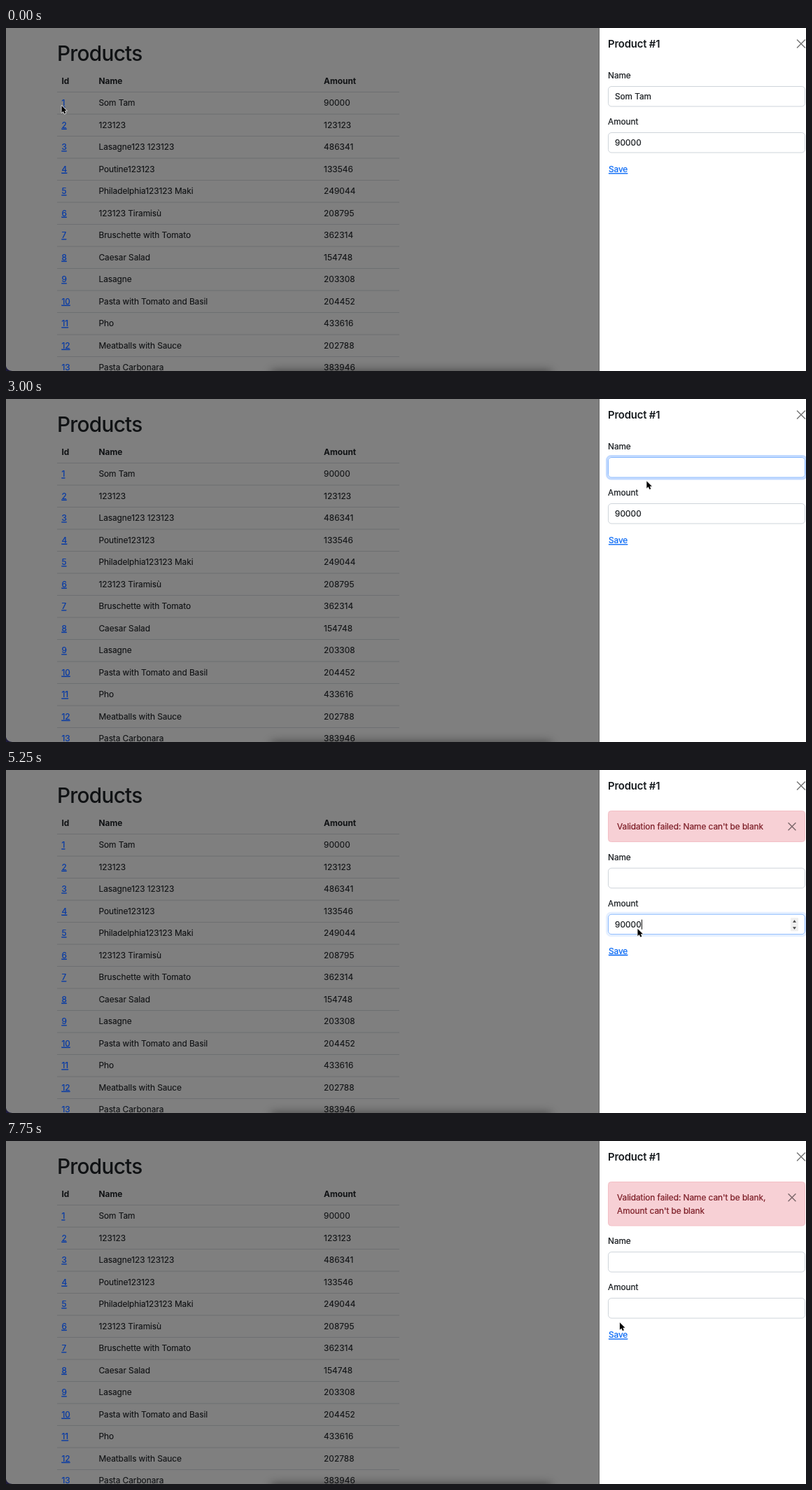
An HTML page for the animation above (8 s loop, 1143 px wide and 490 px high).

```html
<!DOCTYPE html>
<html lang="en">
<head>
<meta charset="utf-8">
<title>Products</title>
<style>
  html, body { margin: 0; width: 100%; height: 100%; overflow: hidden; background: #7f7f7f; }
  svg { display: block; width: 100%; height: 100%; }
  text {
    font: 400 11.9px Inter, "Liberation Sans", sans-serif;
    letter-spacing: -.07px;
    color: #171b1f;
    fill: currentColor;
    stroke: currentColor;
    stroke-width: .22;
    white-space: pre;
  }
  #list text { color: #101214; stroke-width: .1; }
  #list .num, .num { letter-spacing: .07px; }
  #list .link { color: #0539a6; stroke-width: .22; text-decoration: underline; }
  #list line { stroke: #6d6f71; }
  #list .head { font-weight: 700; letter-spacing: 0; stroke: none; }
  #list .title { font-size: 29.8px; font-weight: 500; letter-spacing: -.75px; stroke: none; }
  .subtitle { font-size: 14.9px; font-weight: 600; letter-spacing: -.2px; stroke: none; }
  .save { color: #0567f5; text-decoration: underline; }
  .save.hover { color: #0a58ca; }
  .field { fill: #fff; stroke: #ced4da; }
  .focus .field { stroke: #86b7fe; }
  .ring { fill: none; stroke: #0d6efd; stroke-width: 3; opacity: 0; }
  .mark { fill: #abcef8; }
  .caret { fill: #111; }
  .cross { fill: none; stroke: #777; stroke-width: 1.5; stroke-linecap: round; }
  #alert rect { fill: #f7d0d5; stroke: #f3bfc6; }
  #alert text { color: #7c1d26; }
  #alert .cross { stroke: #7c686b; }
</style>
</head>
<body>
<svg viewBox="0 0 1143 490" preserveAspectRatio="none">
  <defs>
    <filter id="blur" x="-20%" y="-300%" width="140%" height="700%">
      <feGaussianBlur stdDeviation="7"/>
    </filter>
  </defs>
  <rect width="1143" height="490" fill="#7f7f7f"/>
  <g id="list">
    <text class="title" x="73" y="47">Products</text>
  </g>
  <rect x="379" y="490" width="400" height="14" fill="#000" opacity=".5" filter="url(#blur)"/>
  <path d="M0 483Q1 489 9 490H0Z" fill="#1d1b3c"/>

  <rect x="847" width="1" height="490" fill="#666"/>
  <rect x="848" width="295" height="490" fill="#fff"/>
  <text class="subtitle" x="860" y="28">Product #1</text>
  <path class="cross" d="M1130.5 17l11 11m0-11l-11 11"/>

  <g id="alert">
    <rect x="860.5" y="58.5" width="281" height="44" rx="4"/>
    <text x="873" y="85"></text>
    <text x="873" y="103.5">Amount can't be blank</text>
    <path class="cross" d="M1118 75.700l10 10m0-10l-10 10"/>
  </g>

  <g id="form">
    <text x="860" y="72.300">Name</text>
    <g id="name">
      <rect class="ring" x="858.5" y="81.500" width="285" height="32.500" rx="6"/>
      <rect class="field" x="860.5" y="83.500" width="281" height="28.500" rx="4.600"/>
      <rect class="mark" x="870" y="88" width="52" height="19"/>
      <text x="870" y="102.200">Som Tam</text>
      <rect class="caret" x="922" y="91" width="1" height="14"/>
    </g>
    <text x="860" y="138.300">Amount</text>
    <g id="amount">
      <rect class="ring" x="858.5" y="147.500" width="285" height="32.500" rx="6"/>
      <rect class="field" x="860.5" y="149.500" width="281" height="28.500" rx="4.600"/>
      <rect class="mark" x="870" y="154.500" width="38" height="19"/>
      <text class="num" x="870" y="168.200">90000</text>
      <rect class="caret" x="908" y="157" width="1" height="14"/>
      <g id="spin">
        <rect x="1121" y="154.500" width="11" height="19" rx="1" fill="#efefef"/>
        <path d="M1124 161l2.500-3.500 2.500 3.500zm0 6.500l2.500 3.500 2.500-3.500z" fill="#444"/>
      </g>
    </g>
    <text class="save" x="861" y="206.200">Save</text>
  </g>

  <path id="cursor" d="M0 0V10L2.300 7.900 4 11.600 5.800 10.800 4.200 7.200H7.300Z"
        fill="#000" stroke="#e4e4e4" stroke-width="1.600" stroke-linejoin="round" paint-order="stroke"/>
</svg>
<script>
const $ = s => document.querySelector(s);
const LOOP = 8000, STEP = 250;

const products = [
  ['Som Tam', 90000], ['123123', 123123], ['Lasagne123 123123', 486341],
  ['Poutine123123', 133546], ['Philadelphia123123 Maki', 249044],
  ['123123 Tiramisù', 208795], ['Bruschette with Tomato', 362314],
  ['Caesar Salad', 154748], ['Lasagne', 203308],
  ['Pasta with Tomato and Basil', 204452], ['Pho', 433616],
  ['Meatballs with Sauce', 202788], ['Pasta Carbonara', 383946]
];

function add(tag, attrs, text = '') {
  const el = document.createElementNS('http://www.w3.org/2000/svg', tag);
  for (const key in attrs) el.setAttribute(key, attrs[key]);
  el.textContent = text;
  $('#list').append(el);
}

function addRow(cells, y, classes) {
  [79.5, 132.5, 454].forEach((x, i) => add('text', { x, y, class: classes[i] }, cells[i]));
  add('line', { x1: 73, x2: 562, y1: y + 11.7, y2: y + 11.7 });
}

addRow(['Id', 'Name', 'Amount'], 79.8, ['head', 'head', 'head']);
products.forEach(([name, amount], i) =>
  addRow([i + 1, name, amount], 111.3 + i * 31.5, ['link', '', 'num']));

// Pointer stops: time, x, y
const stops = [
  [0, 79.5, 111], [1250, 919.5, 102.5], [1500, 922, 101.5], [2750, 922, 101.5],
  [3750, 880, 203.5], [4500, 880, 203.5], [5250, 902.5, 227], [5750, 904.5, 224.5],
  [6500, 904.5, 224.5], [7000, 884, 245], [7250, 877, 259.5], [LOOP, 877, 259.5]
];

function pointer(t) {
  const i = stops.findIndex(s => s[0] > t);
  const [t0, x0, y0] = stops[i - 1], [t1, x1, y1] = stops[i];
  const p = (t - t0) / (t1 - t0), e = p * p * (3 - 2 * p);
  return [x0 + (x1 - x0) * e, y0 + (y1 - y0) * e];
}

const show = (el, on) => { el.style.display = on ? '' : 'none'; };

function setField(id, { filled, ring, marked, caret }) {
  const box = $(id);
  box.classList.toggle('focus', ring > 0);
  box.querySelector('.ring').style.opacity = ring * .25;
  show(box.querySelector('text'), filled);
  show(box.querySelector('.mark'), marked);
  show(box.querySelector('.caret'), caret);
}

function render(t) {
  const within = (a, b) => t >= a && t < b;
  const errors = t < 4000 ? 0 : t < 7500 ? 1 : 2;
  const [first, second] = $('#alert').querySelectorAll('text');

  show($('#alert'), errors);
  show(second, errors === 2);
  first.textContent = "Validation failed: Name can't be blank" + (errors === 2 ? ',' : '');
  $('#alert rect').setAttribute('height', errors === 2 ? 62.5 : 44);
  $('#form').setAttribute('transform', `translate(0 ${[0, 56.7, 75.1][errors]})`);

  setField('#name', {
    filled: t < 2750,
    ring: within(2000, 4000) ? (t < 2250 ? .5 : 1) : 0,
    marked: within(2250, 2750),
    caret: within(2000, 2250)
  });
  setField('#amount', {
    filled: t < 6750,
    ring: within(5250, 7500) ? (t < 5500 ? .4 : 1) : 0,
    marked: within(5750, 6750),
    caret: within(5250, 5750)
  });
  show($('#spin'), within(5000, 7500));
  $('.save').classList.toggle('hover', within(3750, 4000) || within(7250, 7500));
  $('#cursor').setAttribute('transform', `translate(${pointer(t)})`);
}

function tick(now) {
  render(Math.floor(now % LOOP / STEP) * STEP);
  requestAnimationFrame(tick);
}
tick(performance.now());
</script>
</body>
</html>
```
